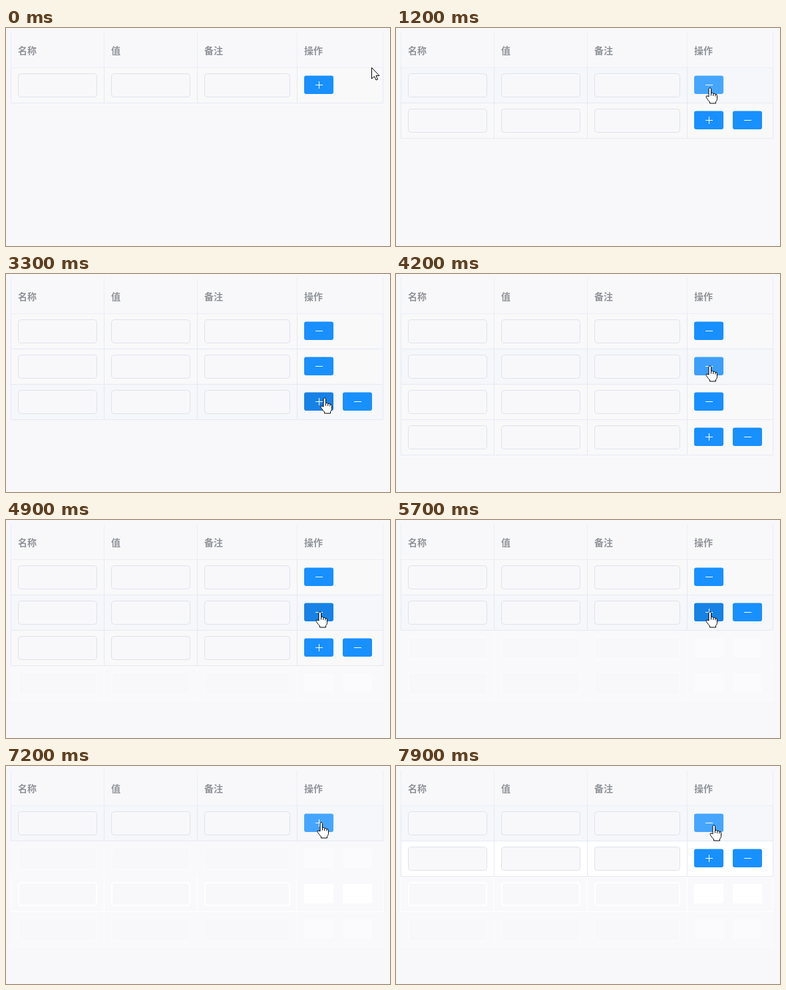
An HTML page with a canvas for the animation above (8000 ms loop, 577 by 327 pixels).

```html
<!DOCTYPE html>
<html lang="zh">
<head>
<meta charset="utf-8">
<style>
  html, body { margin: 0; width: 577px; height: 327px; overflow: hidden; background: #f8f8fb; }
  canvas { display: block; }
</style>
</head>
<body>
<canvas width="577" height="327"></canvas>
<script>
const ctx = document.querySelector('canvas').getContext('2d');
const LOOP = 8000, STEP = 100, PAGE = '#f8f8fb', TOP = 60, ROW = 53;
const columns = [7, 147, 287, 437, 566];
const titles = ['名称', '值', '备注', '操作'];

// When the pointer glides, and where it ends up
const glides = [
  { from: 0, to: 300, x: 472, y: 95 },
  { from: 400, to: 500, x: 472, y: 90 },
  { from: 1700, to: 2200, x: 472, y: 128 },
  { from: 2600, to: 3100, x: 479, y: 186 },
  { from: 3400, to: 4100, x: 472, y: 138 },
  { from: 5900, to: 6100, x: 472, y: 83 },
  { from: 7100, to: 7500, x: 478, y: 89 }
];
// Click time and the number of rows it adds
const clicks = new Map([
  [1100, 1], [2500, 1], [3300, 1], [4300, -1], [4900, -1], [5700, 1], [6400, -1], [6900, -1], [7800, 1]
]);

const arrow = new Path2D('M0 0V16.5L4 13 6.5 18.5 9 17.5 6.5 12H11.5Z');
const hand = new Path2D('M-1.5 13.5V2A1.7 1.7 0 0 1 2 2V8Q4.5 7 5.2 9 7.7 8 8.4 10 11 9.4 11 12V17Q11 19 9 21V23.5H0V21.5Q-5 16-5.5 14-5.5 11.8-3.5 12.5Z');
const knuckles = new Path2D('M2 8V12M5.2 9V12.5M8.4 10V13');

function pointerAt(t) {
  let x = 550, y = 60;
  for (const g of glides) {
    const f = Math.min(1, Math.max(0, (t - g.from) / (g.to - g.from)));
    x += (g.x - x) * f;
    y += (g.y - y) * f;
  }
  return { x: Math.round(x), y: Math.round(y) };
}

// Rows shown at time t, and how often each row has been removed
function tableAt(t) {
  let rows = 1;
  const removed = [0, 0, 0, 0];
  for (const [time, change] of clicks) {
    if (time >= t) break;
    rows += change;
    if (change < 0) removed[rows]++;
  }
  return { rows, removed };
}

function rect(x, y, w, h, color) {
  ctx.fillStyle = color;
  ctx.fillRect(x, y, w, h);
}

function roundBox(x, y, w, h, r, fill) {
  ctx.beginPath();
  ctx.roundRect(x, y, w, h, r);
  ctx.fillStyle = fill;
  ctx.fill();
}

function drawRow(y, fill, lineColor, boxColor, boxLine) {
  rect(7, y, 560, ROW, fill);
  rect(7, y + ROW - 1, 560, 1, lineColor);
  columns.forEach(x => rect(x, y, 1, ROW, lineColor));
  for (let i = 0; i < 3; i++) {
    const x = columns[i] + 11, w = columns[i + 1] - x - 10;
    ctx.lineWidth = boxLine;
    ctx.strokeStyle = boxColor;
    roundBox(x + boxLine / 2, y + 8 + boxLine / 2, w - boxLine, 36 - boxLine, 4, PAGE);
    ctx.stroke();
  }
}

function drawButton(x, y, plus, t, mouse) {
  const over = mouse.x >= x && mouse.x < x + 44 && mouse.y >= y && mouse.y < y + 28;
  const color = !over ? '#1890ff'
    : clicks.has(t) ? '#1682e6'
    : clicks.has(t + STEP) ? '#3d9ffb' : '#46a6ff';
  roundBox(x, y - .5, 44, 27.5, 3, color);
  rect(x + 17, y + 13, 11, 1, '#fff');
  if (plus) rect(x + 22, y + 8, 1, 11, '#fff');
}

// Pale trace of a removed row, whiter each time
function drawTrace(y, times) {
  const white = `rgba(255, 255, 255, ${(times / 2) ** 1.7})`;
  drawRow(y, '#f9f9fb', white, white, 2);
  for (const x of [448, 506]) rect(x, y + 11, 44, 29, white);
}

function drawPointer(shape, { x, y }) {
  ctx.save();
  ctx.translate(x - .5, y - .5);
  ctx.lineWidth = 1;
  ctx.lineJoin = 'round';
  ctx.fillStyle = '#fff';
  ctx.strokeStyle = '#000';
  ctx.fill(shape);
  ctx.stroke(shape);
  if (shape === hand) ctx.stroke(knuckles);
  ctx.restore();
}

function draw(t) {
  const { rows, removed } = tableAt(t), mouse = pointerAt(t);
  const hover = t < 1000 ? -1 : Math.floor((mouse.y - TOP) / ROW);
  rect(0, 0, 577, 327, PAGE);

  columns.forEach(x => rect(x, 6, 1, ROW + 1, '#ebeef5'));
  rect(7, TOP - 1, 560, 1, '#ebeef5');
  ctx.font = 'bold 14px "Noto Sans CJK SC", "Noto Sans CJK", sans-serif';
  ctx.fillStyle = '#909399';
  titles.forEach((title, i) => ctx.fillText(title, columns[i] + 11, 39));

  for (let i = 0; i < 4; i++) {
    const y = TOP + i * ROW;
    if (i >= rows) {
      if (removed[i]) drawTrace(y, removed[i]);
      continue;
    }
    const plain = i && t >= 6500 ? '#fff' : '#f9f9fa';
    drawRow(y, i === hover ? '#f5f7fa' : plain, '#e6e9f2', '#dfe2ea', 1);
    const last = i === rows - 1;
    drawButton(448, y + 12, last, t, mouse);
    if (last && i) drawButton(506, y + 12, false, t, mouse);
  }
  drawPointer(t < 200 ? arrow : hand, mouse);
}

function tick() {
  draw(Math.floor(performance.now() % LOOP / STEP) * STEP);
  requestAnimationFrame(tick);
}
tick();
</script>
</body>
</html>
```
